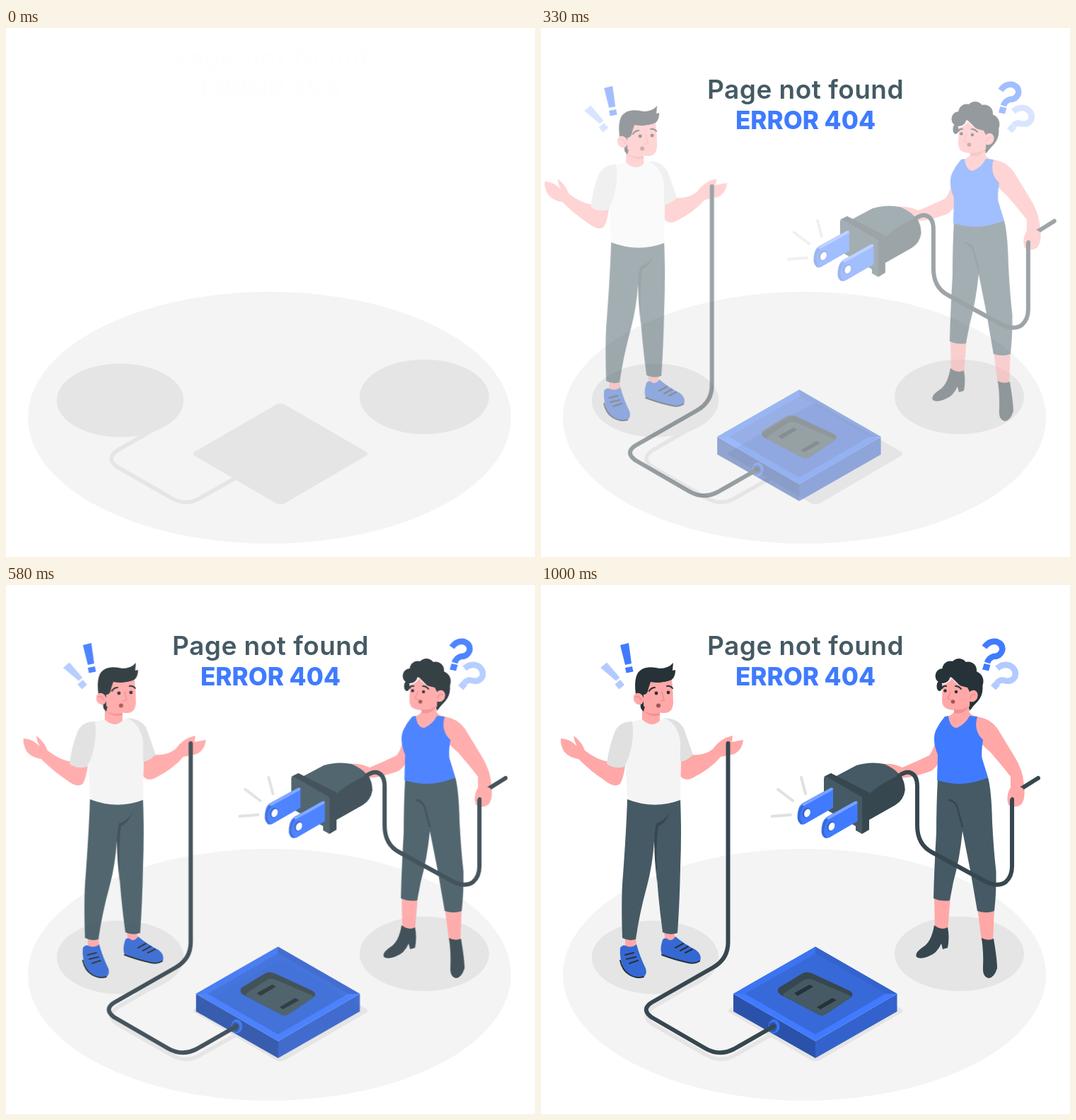
Animation, 748 px wide and 748 px high, one loop 1.04 s. Source, as an HTML page:

```html
<!DOCTYPE html>
<html lang="en">
<head>
<meta charset="utf-8">
<title>Page not found</title>
<style>
  html, body { margin: 0; width: 100%; height: 100%; overflow: hidden; background: #fff; }
  svg { display: block; width: 100vw; height: 100vh; }
  text { font-family: Inter, Roboto, sans-serif; text-anchor: middle; }
  .skin { fill: #ffa8a7; }
  .slate { fill: #455a64; }
  .deep { fill: #37474f; }
  .ink { fill: #263238; }
  .blue { fill: #407bff; }
  .shoe { fill: #3668d4; }
  .pale { opacity: .4; }
  .line { fill: none; stroke-linecap: round; stroke-linejoin: round; }
  .cord { stroke: #37474f; stroke-width: 6; }
  .lace { stroke: #263238; stroke-width: 2; }
  .fold { stroke: #37474f; stroke-width: 2.5; }
  .blush { stroke: #f28f8f; stroke-width: 1.6; }
  .brow { stroke: #263238; stroke-width: 2; }
  .mark { stroke: #407bff; stroke-width: 8.5; stroke-linecap: butt; }
</style>
</head>
<body>
<svg viewBox="0 0 748 748">
  <!-- floor and shadows -->
  <ellipse cx="372.5" cy="551" rx="341.5" ry="178" fill="#f4f4f4"/>
  <g fill="#e5e5e5">
    <ellipse cx="161.5" cy="526.5" rx="89.7" ry="52"/>
    <ellipse cx="591.5" cy="521.5" rx="91.5" ry="52.7"/>
    <path d="M267 599 L381 533 Q388 529 395 533 L509 599 Q514 602 509 605 L396 671 Q388 676 380 671 L267 605 Q262 602 267 599Z"/>
    <path class="line" stroke="#e5e5e5" stroke-width="5.5" d="M222 560 L158 597 Q140 609 158 621 L233 664 Q252 676 272 666 L325 636"/>
  </g>

  <g id="title">
    <text x="374" y="98.5" font-size="37" font-weight="600" letter-spacing=".5" fill="#455a64">Page not found</text>
    <text x="374" y="142" font-size="35" font-weight="800" class="blue">ERROR 404</text>
  </g>

  <g id="left">
    <!-- exclamation marks -->
    <g class="blue">
      <path d="M112 85 L124 82 L128 111 L119 113Z M119 117 L129 115 L130.500 122.500 L120.500 124.500Z"/>
      <path class="pale" d="M84 117 L93 109.500 L111.500 131 L106 135.500Z M104.500 140.500 L112 134 L118 141 L110.500 147.500Z"/>
    </g>

    <!-- man: arms and legs -->
    <g class="skin">
      <path d="M96 250 Q80 248 62 234 Q58 222 46 213 Q47 221 51 228 Q40 217 28 217 Q27 226 33 236 Q40 244 53 246 Q70 263 88 275 Q104 288 112 281 Q117 272 119 255Z"/>
      <path d="M198 246 L197 270 Q203 278 214 273 Q240 260 254 243 L273 239 Q284 234 286 219 L270 222 L271 213 Q253 217 243 232 Q230 242 212 240Z"/>
      <path d="M119 495 L134 495 L135 514 L119 515Z M173 488 L188 488 L190 504 L177 506Z"/>
    </g>
    <path class="shoe" d="M112 513 Q116 507 122 511 Q130 513 135 508 Q140 526 148 542 Q151 553 142 555 Q128 556 119 546 Q110 530 112 513Z M171 505 Q173 496 181 502 Q187 503 190 497 Q203 508 219 516 Q228 523 225 532 Q216 537 200 532 Q184 529 171 523 Q168 515 171 505Z"/>
    <path class="line lace" d="M112 531 Q115 545 125 551 Q135 557 145 554 M171 523 Q190 530 204 533 Q216 537 224 532"/>
    <path class="line lace" d="M119 523 L131 520 M121 529 L134 526 M125 535 L137 531 M190 513 L201 507 M197 517 L208 511 M204 520 L214 515"/>
    <path class="slate" d="M122 302 Q160 316 197 302 Q199 350 197 400 Q196 450 193 492 Q183 496 172 491 Q165 440 162 385 L160 362 Q158 395 150 425 Q139 465 134 501 Q124 504 115 499 Q113 440 116 410 Q121 340 122 302Z"/>
    <path class="deep" d="M182 322 Q174 334 163 337 Q157 360 164 420 Q162 365 166 341 Q176 337 182 322Z"/>

    <!-- man: shirt and head -->
    <path class="skin" d="M143 163 L143 192 Q157 204 168 195 L168 176Z"/>
    <path fill="#f28f8f" d="M145 178 Q155 184 168 181 L168 184 Q155 188 145 178Z"/>
    <path fill="#f4f4f4" d="M125 194 L143 190 Q156 203 168 192 L174 188 Q192 189 196 202 L198 245 L197 304 Q160 318 122 303 L120 255Z"/>
    <path fill="#e0e0e0" d="M129 193 Q112 193 105 206 Q96 228 93 253 Q104 261 118 257 Q131 232 130 202Z M174 188 Q195 189 202 203 L215 240 Q206 249 197 250 L197 222 Q194 196 174 188Z"/>
    <path class="ink" d="M134 155 Q130 125 143 119 Q152 114 168 118 Q180 118 187 110 L186 121 L190 120 Q190 136 176 137 L158 140 L150 160 L145 179 Q139 174 141 167Z"/>
    <path class="skin" d="M155 137 Q170 140 185 134 Q187 150 187 167 Q186 181 174 181 Q155 181 145 171 L145 155 Q151 155 152 146Z"/>
    <ellipse class="skin" cx="138" cy="161" rx="7" ry="8.500" transform="rotate(-20 138 161)"/>
    <path class="line blush" d="M134 158 Q139 156 142 163 M171 151 L174 163 L169 164"/>
    <path class="line brow" d="M153 150 Q156 145 161 145 M178 143 Q183 142 186 146"/>
    <circle class="ink" cx="163" cy="153" r="2.400"/>
    <circle class="ink" cx="180" cy="152" r="2.400"/>
    <circle cx="166" cy="170.500" r="3" fill="#a25552"/>

    <!-- socket box -->
    <path fill="#2b52aa" d="M272 578 L388 645 V669 L272 603Z"/>
    <path fill="#3462cc" d="M503.500 578 L388 645 V669 L503.500 603Z"/>
    <path class="blue" d="M272 578 L388 511.500 L503.500 578 L388 645Z"/>
    <path fill="#3c74f0" d="M272 578 L388 511.500 V521 L288.500 578Z"/>
    <path fill="#3463cc" d="M388 511.500 L503.500 578 H487 L388 521Z"/>
    <path fill="#3769d9" d="M288.500 578 L388 521 L487 578 L388 635.500Z"/>
    <path class="deep" d="M337 569 L370 549 Q376 546 383 549 L437 574 Q444 579 437 584 L404 606 Q397 611 390 606 L338 579 Q332 574 337 569Z"/>
    <path class="slate" d="M344 577 L371 559 Q377 555 384 558 L438 581 Q440 582 437 584 L404 606 Q397 611 390 606 L344 582 Q341 579 344 577Z"/>
    <path class="ink" d="M358 577 L380 565 L385 568 L363 581Z M390 597 L412 584 L418 587 L395 600Z"/>
    <ellipse cx="329.500" cy="624" rx="8" ry="10" fill="#3b73f0"/>
    <ellipse cx="328" cy="625" rx="5.500" ry="7" fill="#2b52aa"/>
    <path class="line cord" d="M264.500 224 V505 Q264.500 529 243 541 L157 590 Q141 600 156 611 L232 655 Q252 667 273 656 L329 624"/>
  </g>

  <g id="right">
    <!-- question marks -->
    <g>
      <path class="line mark" d="M627 88 Q634 78 644 80 Q654 84 652 93 Q649 101 640 101 Q633 103 631 110"/>
      <path class="blue" d="M626.500 111 L635.500 113 L633 121.500 L624 119.500Z"/>
      <g class="pale">
        <path class="line mark" d="M645 118 Q654 110 664 114.500 Q673 120 670 130 Q665 138 655 135 Q650 133 645 138"/>
        <path class="blue" d="M642 135.500 L649 142 L643 148.500 L636 142Z"/>
      </g>
    </g>

    <!-- woman: legs -->
    <path class="skin" d="M556 440 L579 440 L575 488 L557 488Z M617 456 L641 456 L639 505 L623 503Z"/>
    <path class="deep" d="M556 481 Q566 489 575 484 Q578 498 575 513 L568 515 L566 507 Q560 521 548 525 Q536 530 531 526 Q528 520 540 512 Q552 505 556 481Z M623 499 Q632 504 640 500 Q645 530 645 542 Q641 555 633 556 Q624 554 625 540 Q626 520 623 499Z"/>
    <path class="slate" d="M561 274 Q597 286 632 272 Q637 290 638 335 Q640 375 643.500 405 Q644 435 641 461 Q630 465 617 461 Q608 405 596 348 Q592 388 583 420 Q580 436 578 446 Q566 448 555 443 Q556 400 559 350 Q559 310 561 274Z"/>
    <path class="line fold" d="M577 304 Q587 306 589 316 L596 342"/>

    <!-- woman: body -->
    <path class="skin" d="M583 165 L584 180 Q578 186 570 187 L580 215 L608 212 L618 187 Q606 184 605 178 L606 160Z"/>
    <path class="skin" d="M570 200 L562 206 Q556 232 549 241 Q530 250 511 258 Q498 252 484 253 Q486 258 497 263 L508 273 Q525 272 546 265 Q562 261 566 238Z"/>
    <path class="skin" d="M615 186 Q635 188 646 204 L668 240 Q682 262 683 283 Q685 300 680 309 Q672 317 661 311 Q657 299 664 287 L664 271 Q650 253 636 237 Q624 227 620 220 Q610 205 615 186Z"/>
    <path class="blue" d="M571 186 L576 185 Q578 202 588 202 Q600 197 606 185 L617 186 Q611 206 625 219 Q622 240 624 246 L632 272 Q597 288 560 276 L561 240 Q552 218 559 204 Q564 194 571 186Z"/>

    <!-- woman: head -->
    <g class="ink">
      <circle cx="568" cy="128.500" r="10.500"/>
      <circle cx="579" cy="119" r="11.500"/>
      <circle cx="591" cy="116" r="12"/>
      <circle cx="604" cy="120.500" r="12"/>
      <circle cx="611" cy="136" r="14.500"/>
      <ellipse cx="563.500" cy="143" rx="4" ry="7"/>
      <path d="M575 125 L620 125 Q630 150 618 164 Q611 171 606 178 L600 150Z"/>
    </g>
    <path class="skin" d="M568 141 Q577 139 581 132 Q588 143 603 145 L607 153 L606 172 Q592 179 577 176 Q567 174 567 163Z"/>
    <ellipse class="skin" cx="610.500" cy="157" rx="7" ry="8.500" transform="rotate(20 610.500 157)"/>
    <path fill="#f28f8f" d="M584 176 Q596 178 605 171 Q598 184 584 181Z"/>
    <path class="line blush" d="M579 151 L575 160 L579 162 M607 160 Q609 153 614 155"/>
    <path class="line brow" d="M567 146 Q569 142 573 143 M586 143 Q591 143 594 147"/>
    <circle class="ink" cx="571.500" cy="149.500" r="2.200"/>
    <circle class="ink" cx="587" cy="151" r="2.200"/>
    <circle cx="582.500" cy="165" r="2.800" fill="#a25552"/>

    <!-- plug -->
    <path class="line" stroke="#e0e0e0" stroke-width="4" d="M335 289 L356 305 M368 272 L374 295 M327 327 L353 325"/>
    <path class="slate" d="M414 272 L446 255 Q466 249 485 253 Q514 265 514.500 290 Q513 304 501 311 L464 332 L440 300Z"/>
    <path class="deep" d="M464 296 Q474 284 508 268 Q515 278 514.500 291 Q512 304 501 311 L462 333Z"/>
    <path class="deep" d="M400 271 L410 266 L465 294 L455 301Z"/>
    <path class="deep" d="M453 300 L464 294 V346 L454 352Z"/>
    <path class="slate" d="M402 270 L454 300 V352 L445 347 V341 L402 317 Q400 316 400 313 V273Z"/>
    <path class="blue" d="M413 290 L409 287 L369 309 Q362 315 362.500 330 Q365 341 373 338 L413 315Z M447.500 309 L443 306 L404 328 Q396 334 396.500 350 Q399 361 408 357 L447.500 334Z"/>
    <path class="line" stroke="#7ba3ff" stroke-width="4" stroke-linecap="butt" d="M411 288.500 L371 310.500 M445.500 307.500 L406 329.500"/>
    <path class="line" stroke="#3668d4" stroke-width="3" d="M370 313 Q364 320 365 331 L368 337 M404 332 Q398 340 399 351 L402 356"/>
    <g fill="#3462cc">
      <ellipse cx="375.500" cy="322" rx="5.500" ry="7.500" transform="rotate(24 375.500 322)"/>
      <ellipse cx="410" cy="341" rx="5.500" ry="7.500" transform="rotate(24 410 341)"/>
    </g>
    <g fill="#fff">
      <ellipse cx="376.500" cy="322.500" rx="4" ry="6" transform="rotate(24 376.500 322.500)"/>
      <ellipse cx="411" cy="341.500" rx="4" ry="6" transform="rotate(24 411 341.500)"/>
    </g>
    <path class="line cord" d="M506 270 Q514 264 521 265 Q532 268 532 285 V340 Q532 367 553 378 L628 419 Q645 428 657 420 Q666 412 666 398 V303 M703 273 L679 288"/>
    <path class="skin" d="M664 286 Q675 282 682 288 Q686 300 679 310 Q672 314 669 310 Q670 300 673 296 Q663 298 661 310 Q657 298 664 286Z"/>
  </g>
</svg>
<script>
  const LOOP = 1040, FPS = 24, SHIFT = 45;
  const easing = 'cubic-bezier(.27, 0, .48, 1.38)';

  function slide(id, x, y, duration, delay) {
    const anim = document.getElementById(id).animate([
      { opacity: 0, transform: `translate(${x}px, ${y}px)` },
      { opacity: 1, transform: 'translate(0px, 0px)' }
    ], { duration, delay, easing, fill: 'both' });
    anim.pause();
    return anim;
  }

  const slides = [
    slide('title', 0, -SHIFT, 500, -15),
    slide('left', -SHIFT, 0, 1000, 0),
    slide('right', SHIFT, 0, 1000, 0)
  ];

  const start = performance.now();

  function draw(now) {
    const t = Math.max(0, now - start) % LOOP;
    // 24 steps a second; the first pose is held for two of them
    let step = Math.floor(t * FPS / 1000 + .13);
    if (step === 1) step = 0;
    for (const s of slides) s.currentTime = step * 1000 / FPS;
    requestAnimationFrame(draw);
  }
  draw(start);
</script>
</body>
</html>
```
